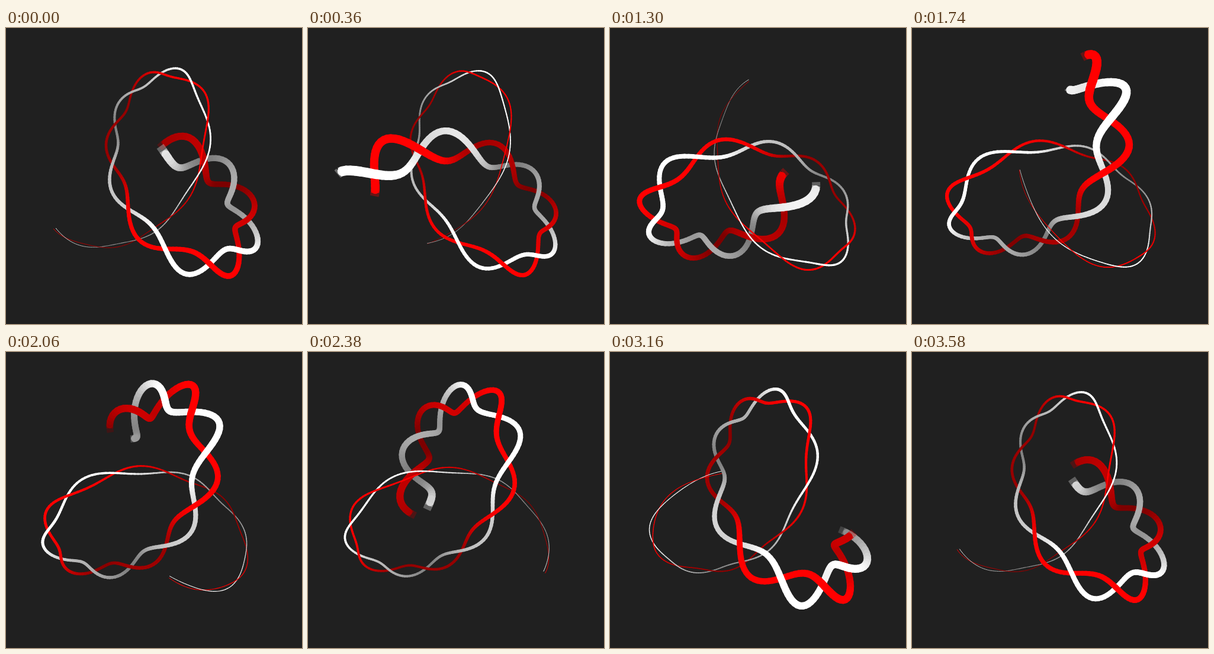
Recreate the animation shown at these times as an HTML page with a canvas. Size 500 by 500 pixels, loop 3.6 s.

```html
<!DOCTYPE html>
<html lang="en">
<head>
<meta charset="utf-8">
<title>Twisted strands on a trefoil knot</title>
<style>
  html, body { margin: 0; width: 100%; height: 100%; overflow: hidden; background: #202020; }
  canvas { display: block; width: 500px; height: 500px; }
</style>
</head>
<body>
<canvas id="stage" width="500" height="500"></canvas>
<script>
const ctx = document.getElementById('stage').getContext('2d');
const { sin, cos, hypot, min, max, PI } = Math;
const RAD = PI / 180;
const LOOP = 3600;
const SCALE = 60;      // knot unit in px
const CAMERA = 428;    // viewer distance in px
const CENTER = { x: 250, y: 260 };
const HEAD = 178;      // head angle at time zero
const TRAIL = 303;     // trail length in degrees
const STEP = 1;
const FADE = 3;
const TWISTS = 11;
const TWIST_R = 30;
const WIDTH = 13.5;

// Projected point of one strand; side is +1 for red, -1 for white.
function strandPoint(deg, turn, age, side) {
  const u = deg * RAD;
  const dx = cos(u) - 4 * cos(2 * u);
  const dy = -sin(u) - 4 * sin(2 * u);
  const flat = hypot(dx, dy);

  // The strand circles in the plane of the flat normal and the depth axis.
  const psi = (TWISTS * (deg - 15) + turn) * RAD;
  const size = (1 - age / 500) ** 3;
  const out = -sin(psi) * side * TWIST_R * size;
  const depth = -cos(psi) * side * TWIST_R * size;

  const x = SCALE * (sin(u) - 2 * sin(2 * u)) + out * dy / flat;
  const y = SCALE * (cos(u) + 2 * cos(2 * u)) - out * dx / flat;
  const z = -SCALE * sin(3 * u) + depth;
  const p = CAMERA / (CAMERA - z);
  return { x: CENTER.x + x * p, y: CENTER.y - y * p, z, w: max(1, WIDTH * size * p) };
}

function shade(z, side) {
  const v = Math.round(max(125, min(255, 212 + 70 * z / SCALE)));
  return side > 0 ? `rgb(${v},0,0)` : `rgb(${v},${v},${v})`;
}

function buildStrand(turn, side) {
  const parts = [];
  let a = strandPoint(HEAD + turn, turn, 0, side);
  for (let age = STEP; age <= TRAIL; age += STEP) {
    const b = strandPoint(HEAD + turn - age, turn, age, side);
    parts.push({ a, b, z: (a.z + b.z) / 2, side, alpha: min(1, age / FADE) });
    a = b;
  }
  return parts;
}

function drawPart({ a, b, z, side, alpha }) {
  ctx.globalAlpha = alpha;
  ctx.lineCap = alpha < 1 || b.w < 1.5 ? 'butt' : 'round';
  ctx.lineWidth = (a.w + b.w) / 2;
  ctx.strokeStyle = shade(z, side);
  ctx.beginPath();
  ctx.moveTo(a.x, a.y);
  ctx.lineTo(b.x, b.y);
  ctx.stroke();
}

function draw(now) {
  const turn = (now % LOOP) / LOOP * 360;
  ctx.globalAlpha = 1;
  ctx.fillStyle = '#202020';
  ctx.fillRect(0, 0, 500, 500);
  [...buildStrand(turn, 1), ...buildStrand(turn, -1)]
    .sort((p, q) => p.z - q.z)
    .forEach(drawPart);
}

function tick() {
  draw(performance.now());
  requestAnimationFrame(tick);
}
tick();
</script>
</body>
</html>
```
